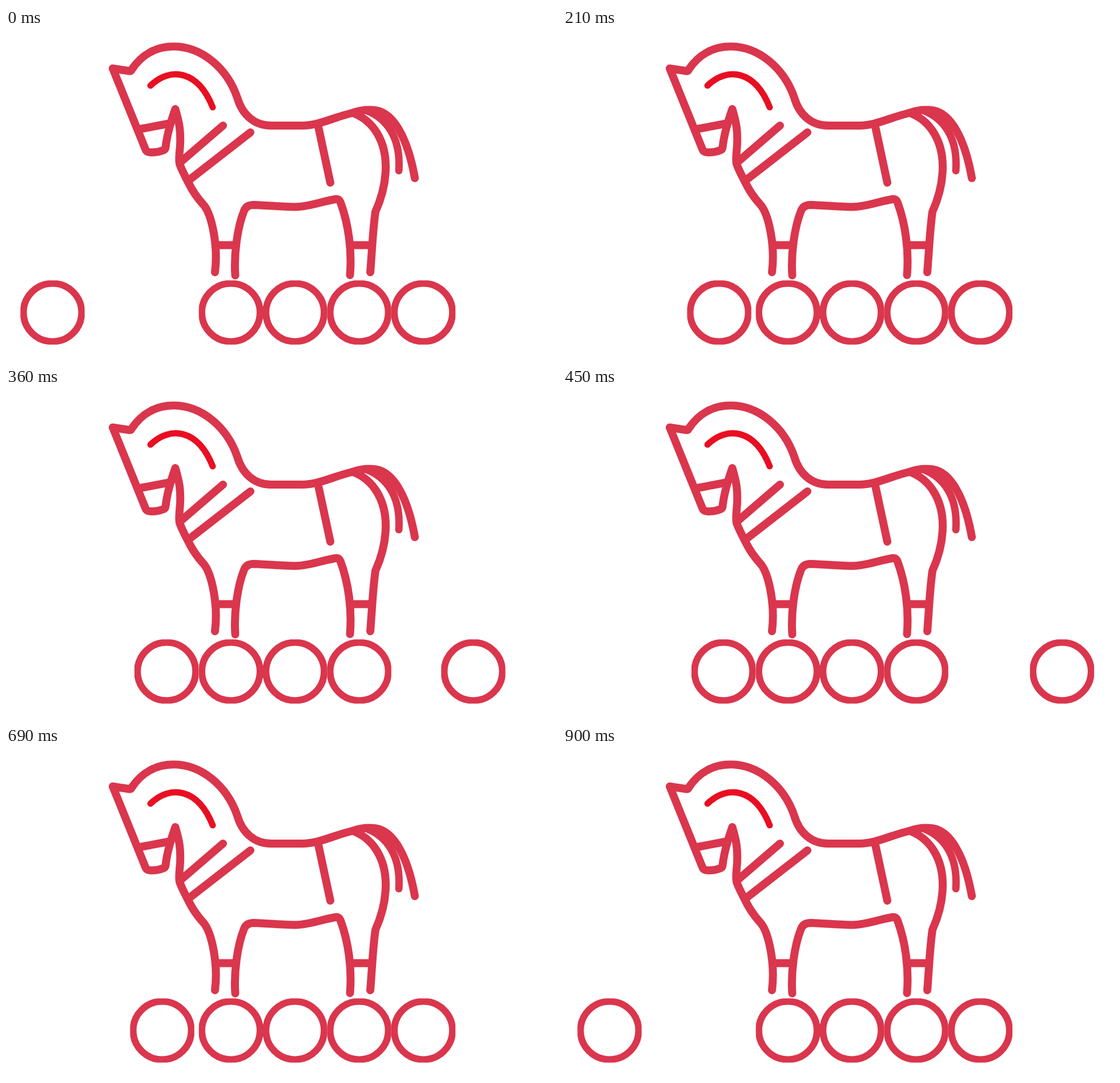
Animation, 965 px wide and 580 px high, one loop 0.93 s. Source, as an HTML page:

```html
<!DOCTYPE html>
<html lang="en">
<head>
<meta charset="utf-8">
<title>Cradle horse</title>
<style>
  html, body { margin: 0; width: 100%; height: 100%; overflow: hidden; background: #fff; }
  svg { display: block; }
</style>
</head>
<body>
<svg width="965" height="580" viewBox="0 0 965 580" fill="none" stroke="#da364d" stroke-width="14" stroke-linecap="round" stroke-linejoin="round">
  <defs>
    <clipPath id="ballBox"><rect x="-56.200" y="-56.200" width="112.400" height="112.400"/></clipPath>
    <clipPath id="horseBox"><rect y="25.300" width="965" height="555"/></clipPath>
    <circle id="ball" r="51" stroke-width="12" clip-path="url(#ballBox)"/>
  </defs>

  <g clip-path="url(#horseBox)">
    <!-- back, from ear to tail -->
    <path d="M187 71L217 75.500Q219 75.500 220 73C238 46 264 32.300 294 32.300C343 33 387 70 405 122C414 153 436 171 464 171H519C548 171 575 156 606 149"/>
    <!-- face, chest and front leg -->
    <path d="M187 71L244 212Q246 218 254 218Q266 218 276 214Q279 213 279.500 209C282 186 288 166 296.500 142C304 168 306 180 305 204C304 220 302 230 304 238C308 250 314 260 321 274C331 294 340 303 347 311C360 328 372 380 366 428"/>
    <!-- belly and inner legs -->
    <path d="M401.500 433.500C399 396 405 350 417 320Q421 310 434 310C462 311 486 313.500 507 313.500C531 313 553 304 577 300Q583 299 586 306C600 344 606 390 602.500 433"/>
    <!-- hind leg -->
    <path d="M638 428C641 392 642 358 647 322C656 302 665 276 665 243C665 200 645 163 608 149"/>
    <!-- tail -->
    <path d="M606 149C620 144 634 142 648 144.500C680 150 704 195 716 263"/>
    <path d="M632 145C665 158 692 190 688 250" stroke-width="13"/>
    <!-- harness -->
    <path d="M235 177L288 167M308 233L380 171M320 267L428 183M547 173L568 271M368 380.500H402M604 380.500H638"/>
    <path d="M253 101C287 68 336 73 362 139" stroke="#e90f22" stroke-width="11"/>
  </g>

  <use href="#ball" x="393.900" y="498.500"/>
  <use href="#ball" x="506.200" y="498.500"/>
  <use href="#ball" x="618.600" y="498.500"/>
  <use id="left" href="#ball" y="498.500"/>
  <use id="right" href="#ball" y="498.500"/>
</svg>
<script>
  const LOOP = 930, STEP = 30, HIT = 240, TURN = 450;
  const left = document.getElementById("left");
  const right = document.getElementById("right");
  const ease = u => (1 - Math.cos(Math.PI * Math.min(1, Math.max(0, u)))) / 2;

  function draw(now) {
    const time = Math.floor(now % LOOP / STEP) * STEP;
    // The swing runs out to TURN and back the same way.
    const swing = TURN - Math.abs(TURN - time);
    left.setAttribute("x", 81.5 + 199.7 * ease(swing / HIT));
    right.setAttribute("x", 731 + 143 * ease((swing - HIT) / (TURN - HIT)));
  }

  const start = performance.now();
  function tick() {
    draw(performance.now() - start);
    requestAnimationFrame(tick);
  }
  tick();
</script>
</body>
</html>
```
